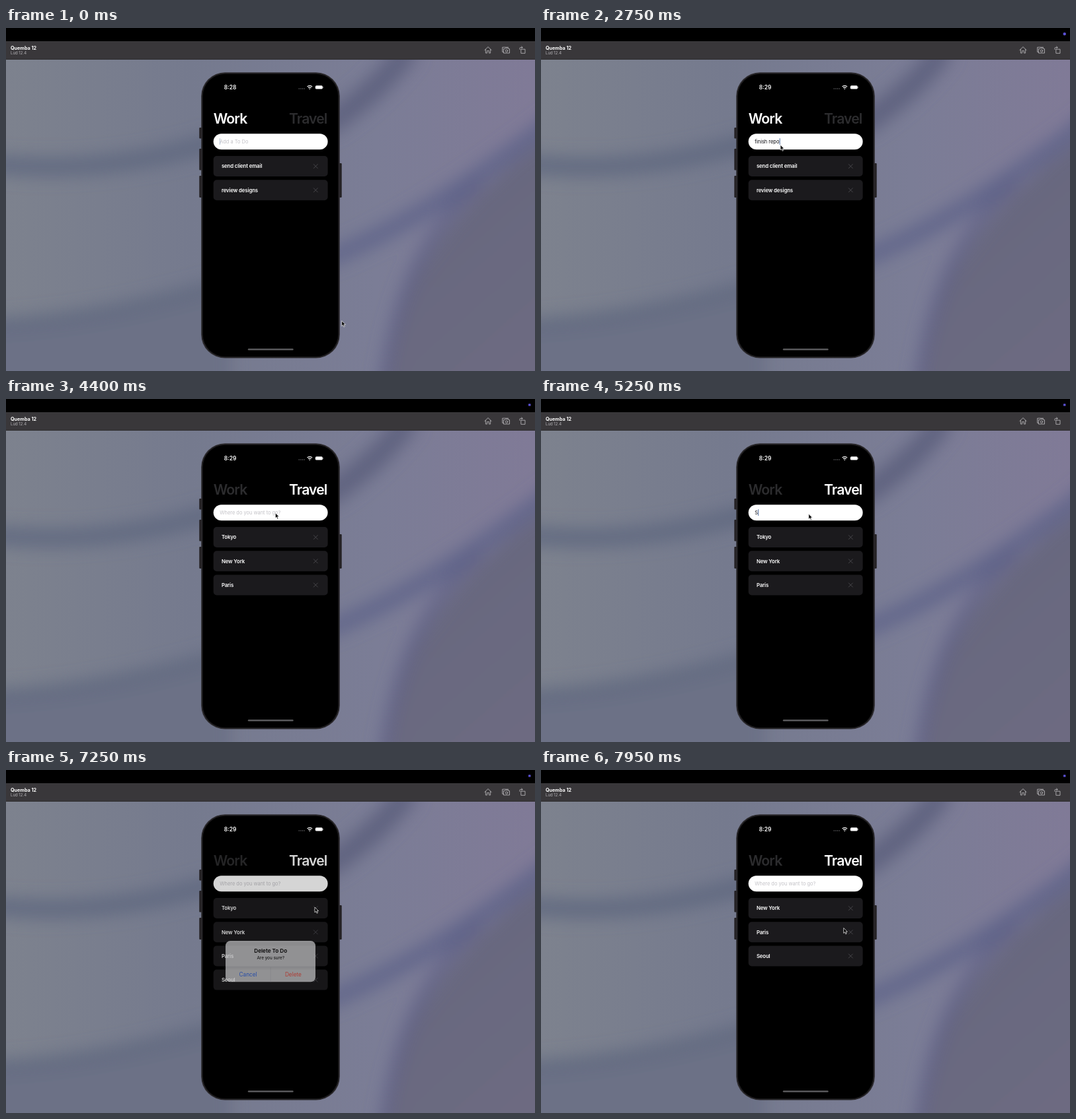
Write an HTML page that moves like this. It is 800 px wide and 520 px high and loops after 8000 ms.

```html
<!DOCTYPE html>
<html lang="en">
<head>
<meta charset="utf-8">
<title>To-do app</title>
<style>
html, body { margin: 0; width: 100%; height: 100%; overflow: hidden; background: #000; }
svg { display: block; width: 800px; height: 520px; font-family: Inter, "Liberation Sans", sans-serif; }
.tab { font-size: 21.2px; font-weight: 600; letter-spacing: -.042em; }
.item { font-size: 7.8px; font-weight: 600; letter-spacing: -.015em; fill: #fff; }
.field { font-size: 7.45px; }
.mid { text-anchor: middle; }
.line { fill: none; stroke: #b3b1b5; stroke-width: .9; stroke-linejoin: round; stroke-linecap: round; }
</style>
</head>
<body>
<svg viewBox="0 0 800 520">
  <defs>
    <linearGradient id="base">
      <stop offset="0" stop-color="#7d828e"/>
      <stop offset=".35" stop-color="#757a8e"/>
      <stop offset=".7" stop-color="#7b7d96"/>
      <stop offset="1" stop-color="#807a97"/>
    </linearGradient>
    <linearGradient id="corner" x2=".6" y2="1">
      <stop offset="0" stop-color="#5f6285"/>
      <stop offset=".45" stop-color="#68687f"/>
      <stop offset="1" stop-color="#6d6b81"/>
    </linearGradient>
    <filter id="soft" x="-30%" y="-30%" width="160%" height="160%"><feGaussianBlur stdDeviation="13"/></filter>
  </defs>

  <!-- wallpaper -->
  <rect width="800" height="520" fill="url(#base)"/>
  <g filter="url(#soft)" fill="none">
    <path d="M-40 455Q150 450 340 385V560H-40Z" fill="#6c7186"/>
    <path d="M-40 204Q150 228 340 165" stroke="#616980" stroke-width="26"/>
    <path d="M-40 452Q140 446 340 385" stroke="#626a80" stroke-width="20"/>
    <path d="M480 150Q560 100 610 30" stroke="#5f627f" stroke-width="34"/>
    <path d="M480 352Q640 290 840 130" stroke="#61658a" stroke-width="24"/>
    <path d="M565 560Q600 300 840 155V560Z" fill="url(#corner)"/>
    <path d="M572 540Q600 330 720 232" stroke="#5e6186" stroke-width="14"/>
  </g>

  <!-- window bar -->
  <rect width="800" height="20"/>
  <rect y="20" width="800" height="28" fill="#39373a"/>
  <rect y="47.3" width="800" height=".7" fill="#2b2a2d"/>
  <text x="7" y="32.6" font-size="7.2" font-weight="700" fill="#fff">Quemba 12</text>
  <text x="7" y="40.2" font-size="6" fill="#b5b3b7">Lud 12.4</text>
  <g class="line">
    <path d="M723.8 33.6L729 28.6L734.2 33.6M725.4 32.5V38H727.6V34.6H730.4V38H732.6V32.5"/>
    <path d="M752.5 36.3H750.7V29.2H759.6V30.3M752.8 31.6H754.6L755.5 30.4H758.6L759.5 31.6H761.5V38H752.8Z"/>
    <circle cx="757.1" cy="34.6" r="1.7"/>
    <path d="M779.2 32.2H785V38.3H779.2ZM777 32.5V30.6Q777 29.5 778.2 29.5H781M779.6 28L781.2 29.5L779.6 31"/>
  </g>
  <rect id="dot" fill="#5a50d2"/>

  <!-- phone -->
  <g fill="#242124">
    <rect x="292.3" y="151" width="4" height="16.5" rx="1"/>
    <rect x="292.3" y="183" width="4" height="32.5" rx="1"/>
    <rect x="292.3" y="224" width="4" height="33" rx="1"/>
    <rect x="503.7" y="205" width="4" height="52" rx="1"/>
  </g>
  <rect x="295.2" y="67.2" width="209.6" height="433.4" rx="36" fill="#2f2d30"/>
  <rect x="296.4" y="68.4" width="207.2" height="431" rx="35" fill="#1b1a1c"/>
  <rect x="297.8" y="69.8" width="204.4" height="428.2" rx="33.5"/>

  <!-- app -->
  <text id="work" class="tab" x="313.7" y="145.2">Work</text>
  <text id="travel" class="tab" x="485.5" y="145.2" text-anchor="end">Travel</text>
  <rect x="313.7" y="160.2" width="172.9" height="24" rx="12" fill="#fff"/>
  <rect id="mark" x="322.8" y="167" height="10.2" fill="#a9bad2"/>
  <text id="hint" class="field" x="323.2" y="174.8" fill="#c3c2c7"></text>
  <text id="typed" class="field" x="323.2" y="174.8" fill="#0b0b10"></text>
  <rect id="caret" y="167.2" width=".9" height="9.8" fill="#3d5f96"/>
  <g id="list"></g>
  <rect id="dim" x="297.8" y="69.8" width="204.4" height="428.2" rx="33.5"/>

  <!-- status bar and home bar -->
  <text id="clock" class="mid" x="339" y="93" font-size="8.4" font-weight="600" fill="#fff"></text>
  <path d="M442.6 92H452" stroke="#5b5b5e" stroke-width="1.3" stroke-dasharray="1.3 1.3"/>
  <g fill="none" stroke="#fff" stroke-width="1.3">
    <path d="M455.6 89Q459.3 85.8 463 89M457.1 90.7Q459.3 88.9 461.5 90.7"/>
    <path d="M458.6 92.3H460"/>
  </g>
  <rect x="467.8" y="87.2" width="11" height="5.4" rx="1.7" fill="#fff"/>
  <rect x="479.3" y="88.9" width=".9" height="2" rx=".4" fill="#8a8a8c"/>
  <rect x="365.8" y="486" width="68.8" height="2.5" rx="1.25" fill="#59595b"/>

  <!-- dialog -->
  <g id="dialog">
    <rect x="334" y="260" width="132" height="60.4" rx="7" fill="#c1c1c3" fill-opacity=".97"/>
    <path id="press" d="M400.3 298.8H466V313.4a7 7 0 0 1-7 7H400.3Z" fill="#a2a1a3"/>
    <path d="M334 298.7H466M400.2 298.7V320.4" stroke="#a6a6a9" stroke-width=".5"/>
    <g class="mid" font-size="8">
      <text x="400.2" y="277.2" font-size="7.9" font-weight="600">Delete To Do</text>
      <text x="400.2" y="287.2" font-size="6.2">Are you sure?</text>
      <text x="367" y="312.8" fill="#2c5fd6">Cancel</text>
      <text x="433.4" y="312.8" fill="#e04a3f">Delete</text>
    </g>
  </g>

  <path id="cursor" d="M0 0V7.9L1.8 6.2L3.1 9.2L4.5 8.6L3.2 5.7H5.7Z" fill="#000" stroke="#fff" stroke-width=".7" stroke-linejoin="round"/>
</svg>
<script>
const LOOP = 8000;
const $ = id => document.getElementById(id);
const set = (id, attrs) => { for (const k in attrs) $(id).setAttribute(k, attrs[k]); };
const clamp = v => Math.max(0, Math.min(1, v));
const ramp = (t, a, b) => clamp((t - a) / (b - a));
const ease = p => p * p * (3 - 2 * p);
const within = (t, a, b) => t >= a && t < b;

const TAB = 3900, ADD_WORK = 3200, ADD_TRAVEL = 6200, OPEN = 7150, CLOSE = 7750, REMOVE = 7800;

// time, x, y
const path = [
  [50, 507.7, 444], [850, 362, 177.2], [3250, 362, 177.2], [3500, 440, 149],
  [3600, 440, 149], [3800, 466, 139], [4050, 466, 139], [4450, 404.8, 174.3],
  [6450, 404.8, 174.3], [6650, 376, 148.8], [6700, 376, 148.8], [7050, 467, 208],
  [7350, 467, 208], [7600, 425.2, 306], [7750, 425.2, 306], [7950, 457.7, 239.5]
];

// key press times for each entry
const entries = [
  { text: "finish report", end: ADD_WORK,
    keys: [1250, 1350, 1550, 1700, 1850, 2000, 2150, 2300, 2450, 2600, 2750, 2900, 3050] },
  { text: "Seoul", end: ADD_TRAVEL, keys: [5250, 5500, 5700, 5850, 6000] }
];

function cursorAt(t) {
  let i = path.findIndex(k => k[0] > t);
  if (i < 0) return path[path.length - 1].slice(1);
  if (i === 0) return path[0].slice(1);
  const [a, x, y] = path[i - 1], [b, u, v] = path[i];
  const p = ease(ramp(t, a, b));
  return [x + (u - x) * p, y + (v - y) * p];
}

function itemsAt(t) {
  if (t < TAB) return ["send client email", "review designs", ...(t >= ADD_WORK ? ["finish report"] : [])];
  return [...(t < REMOVE ? ["Tokyo"] : []), "New York", "Paris", ...(t >= ADD_TRAVEL ? ["Seoul"] : [])];
}

const card = (name, i) => `<g transform="translate(313.7 ${194 + i * 36.2})">
  <rect width="172.9" height="31" rx="5" fill="#1b1a1d"/>
  <text class="item" x="12.2" y="18.4">${name}</text>
  <path d="M151.3 12.3l6.6 6.6m0-6.6l-6.6 6.6" stroke="#4b4a4e" stroke-width=".9"/></g>`;

let shown = "";
function drawList(t) {
  const html = itemsAt(t).map(card).join("");
  if (html !== shown) $("list").innerHTML = shown = html;
}

function drawField(t) {
  const entry = entries.find(e => within(t, e.keys[0], e.end));
  const text = entry ? entry.text.slice(0, entry.keys.filter(k => k <= t).length) : "";
  $("typed").textContent = text;
  $("hint").textContent = text ? "" : t < TAB ? "Add a To Do" : "Where do you want to go?";
  const width = text ? $("typed").getComputedTextLength() : 0;
  const blink = t < 900 ? .4 + .4 * Math.sin(t / 500 * Math.PI) : 1;
  const focused = t < ADD_WORK || within(t, 4500, ADD_TRAVEL);
  set("caret", { x: 323 + width + (text ? .5 : 0), opacity: focused ? blink : 0 });
  set("mark", { width: width + 1.2, opacity: within(t, 1350, 1500) ? 1 : 0 });
}

function drawDialog(t) {
  const enter = ease(ramp(t, OPEN, OPEN + 150));
  const alpha = enter * (1 - ramp(t, CLOSE, CLOSE + 150));
  const scale = 1.12 - .12 * enter;
  set("dim", { opacity: .22 * alpha });
  set("dialog", { opacity: alpha, transform: `translate(400 290) scale(${scale}) translate(-400 -290)` });
  set("press", { opacity: within(t, 7650, LOOP) ? 1 : 0 });
}

function draw(t) {
  const travel = t >= TAB, big = t < 2800;
  set("work", { fill: travel ? "#2c2c2e" : "#fff" });
  set("travel", { fill: travel ? "#fff" : within(t, 3750, TAB) ? "#272729" : "#2c2c2e" });
  set("dot", big
    ? { x: 789.5, y: 6.7, width: 4.5, height: 4.5, rx: 2.25 }
    : { x: 790, y: 7.3, width: 3.5, height: 3.2, rx: .6 });
  set("dot", { opacity: t < 500 ? 0 : 1 });
  $("clock").textContent = t < 700 ? "8:28" : "8:29";
  drawField(t);
  drawList(t);
  drawDialog(t);
  set("cursor", { transform: `translate(${cursorAt(t)})` });
}

const start = performance.now();
function tick() {
  draw((performance.now() - start) % LOOP);
  requestAnimationFrame(tick);
}
tick();
</script>
</body>
</html>
```
